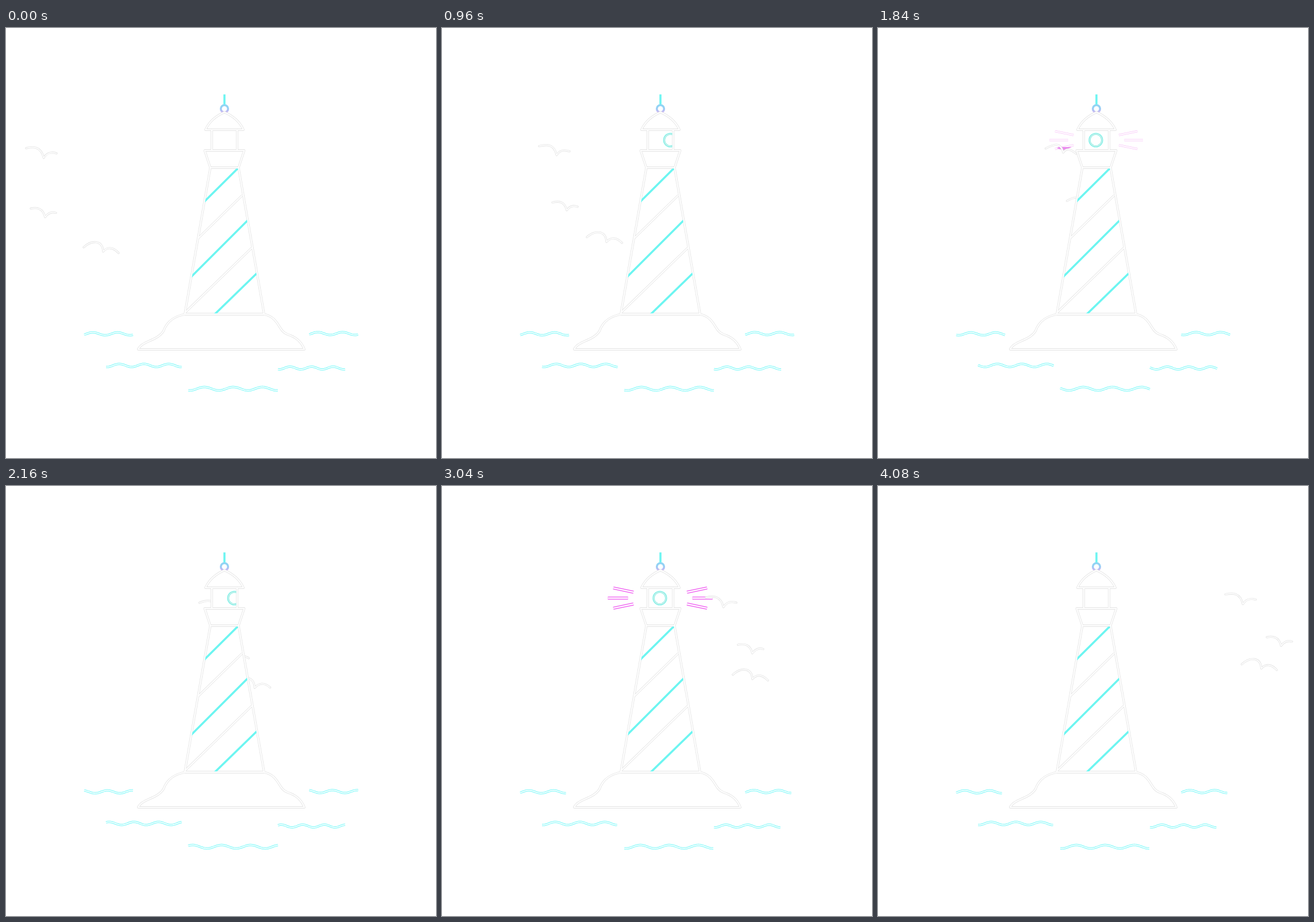
An HTML page for the animation above (4120 ms loop, 748 px wide and 748 px high).

```html
<!DOCTYPE html>
<html lang="en">
<head>
<meta charset="utf-8">
<title>Lighthouse</title>
<style>
  html, body { margin: 0; width: 100%; height: 100%; overflow: hidden; background: #fff; }
  svg { display: block; width: 100vw; height: 100vh; fill: none; stroke-linejoin: round; }
  .edge { stroke: #e3e3e3; stroke-width: 3.8; }
  .core { stroke: #fff; stroke-width: 2.2; }
  .bird .edge, .bird .core { stroke-linecap: round; }
  .bird .edge { stroke-width: 3.4; }
  .bird .core { stroke-width: 1.7; }
  .wave .edge { stroke: #76f8f8; stroke-width: 3.8; }
  .wave .core { stroke-width: 1.8; }
  .ray .edge { stroke: #f8c3f8; stroke-width: 3.6; }
  .ray .core { stroke-width: 2; }
  .ray.strong .edge { stroke: #ee55f0; stroke-width: 5; }
  .ray.strong .core { stroke-width: 2.4; }
  .cyan { stroke: #6df5f1; stroke-width: 3.6; }
</style>
</head>
<body>
<svg viewBox="0 0 748 748">
  <defs>
    <clipPath id="room"><path d="M359.5 178.5H400.5V211.5H359.5Z"/></clipPath>
    <clipPath id="shaft"><path d="M355 244.5H404L449 497H311Z"/></clipPath>
    <linearGradient id="knob" x1="0" y1="0" x2="0" y2="1">
      <stop offset="0" stop-color="#8fd6f4"/>
      <stop offset=".5" stop-color="#9ccdf5"/>
      <stop offset="1" stop-color="#cdb2f3"/>
    </linearGradient>
    <g id="house">
      <path d="M347 177Q356 157 380 146.500Q404 157 413 177Z"/>
      <path d="M358 177H402V213H358Z"/>
      <path d="M345.500 213H414.500L404.500 243H355.500Z"/>
      <path d="M355.500 243H404.500L449 497.500H311Z"/>
      <path d="M230 559C235 545 264 544 274 527C281 508 295 501 311 498H449C464 501 470 510 476 520C481 529 486 532 494 534.500C506 539 514 546 519 559Z"/>
    </g>
    <path id="bands" d="M411 291L334 366M428 382L311 495.500"/>
  </defs>

  <g id="waves"></g>
  <g id="rays"></g>
  <path id="glint" fill="#ea8cee" d="M311 209L318 205L320 207L337 207L324 213L317 211Z"/>
  <g id="birds"></g>

  <path class="cyan" d="M380 115.500V134"/>
  <circle cx="380" cy="140.500" r="6.300" stroke="url(#knob)" stroke-width="3.600"/>
  <use href="#house" class="edge" fill="#fff"/>
  <g clip-path="url(#shaft)">
    <use href="#bands" class="edge"/>
    <use href="#bands" class="core"/>
    <path class="cyan" d="M404 243.500L345 302M421 334L322 433M437 426L362 499"/>
  </g>
  <use href="#house" class="core"/>
  <g clip-path="url(#room)">
    <g id="lamp">
      <circle cy="195" r="10.900" stroke="#72f1e8" stroke-width="3.400"/>
      <circle cy="195" r="10.700" stroke="#dcefea" stroke-width="1.300"/>
    </g>
  </g>
</svg>

<script>
const LOOP = 4120, STEP = 40;
const NS = 'http://www.w3.org/2000/svg';
const byId = id => document.getElementById(id);
const clamp = (v, lo, hi) => Math.min(hi, Math.max(lo, v));

function add(tag, parent, cls) {
  const el = document.createElementNS(NS, tag);
  if (cls) el.setAttribute('class', cls);
  return parent.appendChild(el);
}

// A line drawn as a coloured edge with a white core.
function hollow(parent, cls) {
  const g = add('g', byId(parent), cls);
  const lines = ['edge', 'core'].map(c => add('path', g, c));
  return { g, draw: d => lines.forEach(l => l.setAttribute('d', d)) };
}

// Waves: the crest runs left and rests after six wavelengths.
const WAVE_PERIOD = 490, WAVE_END = WAVE_PERIOD * 6;
const waves = [
  { from: 136, to: 221, rest: 215.5, y: 532, amp: 2.5, len: 43, crest: 151 },
  { from: 174, to: 305.5, rest: 304.5, y: 587, amp: 2.7, len: 43, crest: 197 },
  { from: 317, to: 473, rest: 472, y: 627.5, amp: 3, len: 50.5, crest: 345 },
  { from: 473, to: 590, rest: 588.5, y: 591.5, amp: 2.4, len: 37.5, crest: 494 },
  { from: 527.5, to: 612.5, rest: 607.5, y: 531.5, amp: 2.5, len: 43, crest: 542.5 }
].map(w => ({ ...w, line: hollow('waves', 'wave') }));

function drawWave(w, t) {
  const crest = w.crest - w.len * Math.min(t, WAVE_END) / WAVE_PERIOD;
  const end = t < WAVE_END ? w.to : w.rest;
  const pts = [];
  for (let x = w.from; x < end + 2; x += 2) {
    const px = Math.min(x, end);
    const y = w.y - w.amp * Math.cos(2 * Math.PI * (px - crest) / w.len);
    pts.push(px.toFixed(1) + ' ' + y.toFixed(2));
  }
  w.line.draw('M' + pts.join('L'));
}

// Birds: steady drift, wing tips shifted by dip while flapping.
const FLAP = 510;
const birds = [
  { x: 35, y: 209, vx: .1395, vy: -.005, dip: 11,
    d: k => `M0 ${k}C13 ${-3 + k * .6} 26 -3 30.500 17C36 8 43 ${6 + k * .5} 53 ${9 + k}` },
  { x: 43, y: 314, vx: .1552, vy: -.0125, dip: 11,
    d: k => `M0 ${k}C11 ${-2 + k * .6} 21 -1 25 15C30 8 36 ${5 + k * .5} 44 ${7.5 + k}` },
  { x: 135, y: 381.5, vx: .122, vy: -.0175, dip: -7,
    d: k => `M0 ${k}C14 ${-13 + k * .5} 33 -13 34 7.500C41 -1 51 ${-1 + k * .5} 61 ${10 + k}` }
].map(b => ({ ...b, line: hollow('birds', 'bird') }));

function drawBird(b, t) {
  const flap = (1 - Math.cos(2 * Math.PI * t / FLAP)) / 2;
  b.line.draw(b.d(b.dip * flap));
  b.line.g.setAttribute('transform', `translate(${b.x + b.vx * t} ${b.y + b.vy * t})`);
}

// Rays: head runs out first, then the tail catches up.
const AXIS = 379.6, REACH = 56, RAY_STARTS = [500, 1700, 2860];
const rays = [];
for (const side of [-1, 1])
  for (const slope of [-1, 0, 1])
    rays.push({ side, slope, line: hollow('rays', 'ray') });

function drawRay(r, t) {
  const pass = RAY_STARTS.findLastIndex(s => t >= s);
  const age = pass < 0 ? 0 : t - RAY_STARTS[pass];
  const head = clamp(age * .245, 0, REACH);
  const tail = clamp((age - 130) * .18, 0, REACH);
  const at = s => {
    const x = AXIS + r.side * ((r.slope ? 37.5 : 47) + s);
    return x.toFixed(2) + ' ' + (195 + r.slope * (8.3 + s * .212)).toFixed(2);
  };
  r.line.g.setAttribute('class', pass === 2 ? 'ray strong' : 'ray');
  r.line.draw(head > tail ? `M${at(tail)}L${at(head)}` : '');
}

// Lamp: three passes across the lantern room.
function drawLamp(t) {
  const pass = (t - 50) / 1200;
  const on = pass >= 0 && pass < 3;
  byId('lamp').setAttribute('transform', `translate(${on ? 345 + 69 * (pass % 1) : 300} 0)`);
}

const start = performance.now();
function frame() {
  const now = (performance.now() - start) % LOOP;
  const t = Math.floor(now / STEP) * STEP;
  waves.forEach(w => drawWave(w, t));
  birds.forEach(b => drawBird(b, t));
  rays.forEach(r => drawRay(r, t));
  drawLamp(t);
  byId('glint').style.display = t >= 1800 && t <= 1880 ? '' : 'none';
  requestAnimationFrame(frame);
}
frame();
</script>
</body>
</html>
```
